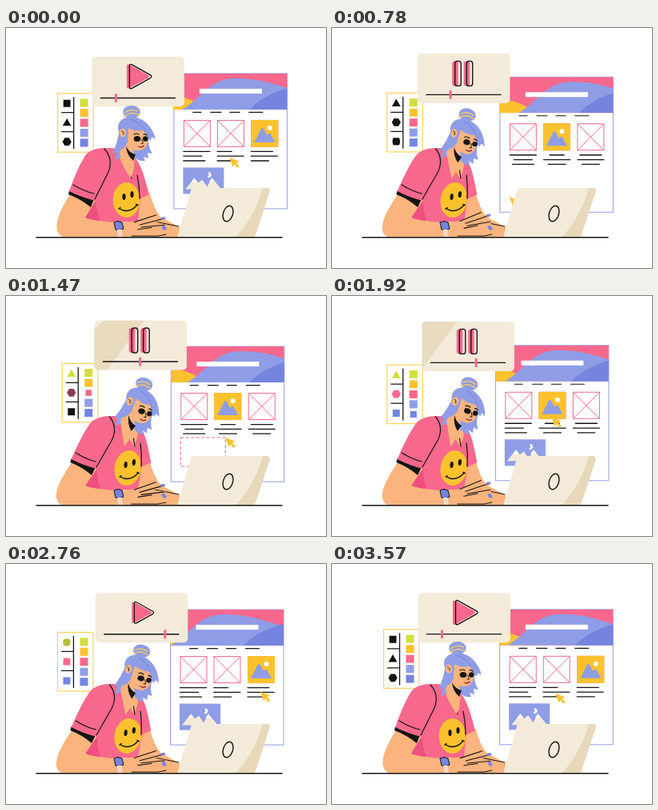
Write an HTML page that moves like this. It is 400 px wide and 300 px high and loops after 3.6 s.

```html
<!DOCTYPE html>
<html lang="en">
<head>
<meta charset="utf-8">
<title>Designer at work</title>
<style>
html, body { margin: 0; width: 100%; height: 100%; overflow: hidden; background: #fff; }
svg { display: block; width: 100vw; height: 100vh; }
.ink { fill: none; stroke: #151515; stroke-width: 1.4; stroke-linecap: round; stroke-linejoin: round; }
.pink { fill: #f7688c; }
.rose { fill: #ee4f80; }
.blue { fill: #8f9de6; }
.deep { fill: #7584de; }
.gold { fill: #fcc22e; }
.skin { fill: #fbb47d; }
.cream { fill: #f3eada; }
.tan { fill: #e6d8b8; }
.white { fill: #fff; }
.dark { fill: #151515; }
</style>
</head>
<body>
<svg viewBox="0 0 400 300" xmlns="http://www.w3.org/2000/svg">
  <defs>
    <clipPath id="headClip"><rect width="141.5" height="45"/></clipPath>
    <clipPath id="videoClip"><rect width="115.5" height="62" rx="5"/></clipPath>
  </defs>

  <g id="page">
    <rect width="141.5" height="169" fill="#fff" stroke="#8f9de6"/>
    <g clip-path="url(#headClip)">
      <rect class="pink" width="141.5" height="45"/>
      <path class="gold" id="sand" d="M-20 45V30Q15 22 44 45Z"/>
      <path class="blue" id="hill" d="M-62 45C-38 32 -28 6 4 6S48 12 90 24V45Z"/>
      <path class="deep" id="slope" d="M95 45C108 32 124 22 160 14V45Z"/>
    </g>
    <rect class="white" x="32" y="19" width="78" height="6"/>
    <path class="ink" d="M24 48.5h10M46 48.5h13M70 48.5h12M94 48.5h17" style="stroke-width:1.2"/>
    <g id="copy" class="ink" style="stroke-width:1.3"></g>
    <g id="boxes" fill="#fff" stroke="#f7688c"></g>
    <g id="night">
      <rect class="blue" width="51" height="33"/>
      <path class="cream" d="M3 27L14 13L19 19L24 15L30 24L36 13L48 27Z"/>
      <path class="white" d="M14 13L18 18L15 17L13 19L11 17ZM36 13L40 18L37 17L34 19L33 17Z"/>
      <path class="white" d="M31 6a3.4 3.4 0 1 1-1 6a3.6 3.6 0 0 0 1-6Z"/>
    </g>
    <g id="photo">
      <rect class="gold" width="34" height="34"/>
      <path class="blue" d="M4 28L12.5 11Q14 9 15.5 11L20 19L22 17Q23 16 24 17L30 28Z"/>
      <circle class="white" cx="23.5" cy="10" r="3"/>
    </g>
    <rect id="marquee" fill="none" stroke="#f7688c" stroke-width="1.1" stroke-dasharray="4 2.5"/>
    <path class="gold" id="cursor" d="M0 0L12 4.5L8.5 6.5L12.5 11L10 13L6.5 8.5L4 11.5Z"/>
  </g>

  <g id="chart">
    <rect width="44.5" height="73.5" fill="#fff" stroke="#fcd25a" stroke-width="1.2"/>
    <path class="ink" d="M20 5V69M5 24H20M5 48H20" style="stroke-width:1.3"/>
    <g id="swatches"></g>
    <g id="forms"></g>
  </g>

  <g id="video">
    <rect class="cream" width="115.5" height="62" rx="5"/>
    <g clip-path="url(#videoClip)"><path id="sheen" class="tan" d="M-20 62V26L14 0H62L16 62Z"/></g>
    <g id="play">
      <path class="pink" d="M43.5 12Q43.5 8 47 10L70 22.500Q73 24.500 70 26.500L47 39Q43.500 41 43.500 37Z"/>
      <path class="ink" d="M47 12Q47 8 50.500 10L73 22.500Q76 24.500 73 26.500L50.500 39Q47 41 47 37Z"/>
    </g>
    <g id="pause"></g>
    <path class="ink" d="M11 51.500H104"/>
    <rect class="pink" id="knob" y="46" width="3" height="11" rx="1"/>
  </g>

  <path class="skin" d="M163 208L180 207Q184 224 193 236L217 249V262H160L150 240Z"/>
  <g id="torso">
    <path class="skin" d="M82 204C73 220 61 238 64 253Q66 262 78 262H142L137 242L99 237L114 216Z"/>
    <path class="dark" d="M79 203L110 214L106 224Q92 213 78 208Z"/>
    <path class="pink" d="M142 151C125 149 110 149 101 157C93 167 86 185 79 204Q95 212 112 216L99 237Q130 246 165 241L168 213L179 208C174 190 170 172 161 162Z"/>
    <path class="rose" d="M112 216L99 237Q107 240 118 241Q113 228 112 216Z"/>
    <path class="skin" d="M139 151Q143 170 156 188Q161 178 160 158Z"/>
    <ellipse class="gold" cx="150.500" cy="215" rx="16.800" ry="22"/>
    <ellipse class="dark" cx="147.500" cy="211" rx="2.100" ry="4"/>
    <ellipse class="dark" cx="157.500" cy="208" rx="2.100" ry="4"/>
    <path class="ink" d="M142 226Q154 233 164 221M141 226l2-1.500M162.500 220.500l2.500 1"/>
    <path class="pink" d="M161 172L179 208L166 214Q168 196 161 172Z"/>
    <path class="ink" d="M123 151C131 160 132 170 128 180L111 214M84 196Q97 204 110 207M155 178L157 188M164 184Q167 198 167 213" style="stroke-width:1.2"/>
  </g>

  <g id="head">
    <path class="blue" d="M142 125Q140 142 133 157L138 155L137 165Q143 163 146 158L148 163Q155 153 154 134Z"/>
    <path class="blue" d="M157 113C174 114 181 124 184 135L178 140Q178 149 183 157L177 156L178 163L172 161L174 166Q167 167 162 163Q155 156 157 146Z"/>
    <path class="skin" d="M148 134L142 157Q148 170 156 187Q162 176 160 155Z"/>
    <path class="dark" d="M150 148Q154 156 162 158L159 166Q151 159 150 148Z"/>
    <path class="skin" d="M147 122L149 142C152 150 160 154 168 153C174 151 177 146 177 140L174 124Z"/>
    <path class="blue" d="M140 126C139 115 149 110 159 111C173 113 183 123 187 139L182 136L181 141Q175 134 172 128Q161 130 153 125L152 143Q149 150 143 153Q146 142 145 126L141 130Z"/>
    <ellipse class="skin" cx="146" cy="131" rx="4" ry="5.500"/>
    <path class="ink" d="M144.500 129q3 0 2.500 4" style="stroke-width:.9"/>
    <path class="ink" d="M160 133q3-2 6 0M172 133q2-1 4 1" style="stroke-width:1.2"/>
    <ellipse class="dark" cx="164" cy="138.500" rx="4.300" ry="3.500"/>
    <ellipse class="dark" cx="174.200" cy="138.500" rx="3.200" ry="3.200"/>
    <path class="ink" d="M169.500 139L171.500 144L169 144.500" style="stroke-width:.9"/>
    <path d="M165 148Q169 150.500 172.500 147" fill="none" stroke="#8e2740" stroke-width="1.300"/>
    <ellipse class="blue" cx="157" cy="105" rx="10.800" ry="8"/>
    <path d="M147 111Q157 103 167 109M148 106Q156 100 165 104" fill="none" stroke="#f1c865" stroke-width="1.500"/>
    <path class="ink" d="M155 114Q167 117 174 128" style="stroke:#6e7dd5;stroke-width:.8"/>
  </g>

  <path class="skin" d="M140 262L138 245L163 242L181 238L217 249V262Z"/>
  <path class="ink" d="M157 260H190L200 258M186 242L216 248" style="stroke-width:1"/>
  <g id="hand">
    <path class="skin" d="M140 242Q153 244 165 240L187 231Q190 231 188 234L178 239L196 235Q200 236 197 238L181 243L199 243Q201 246 197 247L181 248L164 253L142 258Z"/>
    <path class="ink" d="M160 242L187 232M167 245L197 236M169 248L198 244M165 251L182 248" style="stroke-width:1.100"/>
    <path class="deep" d="M193 234.500l5-.5l1 2.500l-5 1.500Z"/>
  </g>
  <path class="deep" d="M194 248l4-1.500l3 5l-4 1.500Z"/>
  <path class="deep" d="M135 243Q140 240 145 243L147 251Q142 254 137 252Z" stroke="#151515"/>
  <path d="M139 252L140 262H146L145 252Z" fill="#f3d6c4"/>

  <path class="cream" d="M235 200H325Q331 200 329.500 205L312 258Q311 262 307 262H214L231 203Q232 200 235 200Z"/>
  <path class="tan" d="M321 200H325Q331 200 329.500 205L312 258Q311 262 307 262H287Q311 236 321 200Z"/>
  <ellipse class="ink" cx="277.500" cy="232" rx="6" ry="10" transform="rotate(17 277.500 232)"/>
  <path class="ink" d="M38 261.700H345" style="stroke-width:1.500"/>
</svg>
<script>
const LOOP = 3600, NS = "http://www.w3.org/2000/svg";
const $ = id => document.getElementById(id);
const set = (el, o) => { for (const k in o) el.setAttribute(k, o[k]); };
const add = (parent, tag, o) => {
  const el = document.createElementNS(NS, tag);
  set(el, o);
  return parent.appendChild(el);
};
const clamp = v => Math.max(0, Math.min(1, v));
const mix = (a, b, p) => a + (b - a) * p;
const ease = p => p * p * (3 - 2 * p);
const ramp = (t, a, b) => ease(clamp((t - a) / (b - a)));
const pulse = (t, a, b, c, d) => ramp(t, a, b) * (1 - ramp(t, c, d));
const wave = (t, peak) => Math.cos((t - peak) / LOOP * 2 * Math.PI);
const move = (el, x, y, more = "") => set(el, { transform: `translate(${x} ${y}) ${more}` });
const show = (el, v) => set(el, { opacity: v });

// Eased value through alternating time and value entries
function track(t, ...k) {
  for (let i = 2; i < k.length; i += 2)
    if (t < k[i]) return mix(k[i - 1], k[i + 1], ramp(t, k[i - 2], k[i]));
  return k[k.length - 1];
}

for (const x of [12, 54, 96.5])
  move(add($("boxes"), "path", { d: "M.5.500H33.500V33.500H.5ZL33.500 33.500M33.500.500L.500 33.500" }), x, 58);

for (const x of [46.8, 61.3]) {
  add($("pause"), "rect", { class: "pink", x: x - 3.5, y: 9.5, width: 7.5, height: 31, rx: 3 });
  add($("pause"), "rect", { class: "ink", x, y: 9.5, width: 7.5, height: 31, rx: 3 });
}

const swatches = ["#d3de3e", "#fcc22e", "#f7688c", "#8f9de6", "#7584de"].map(fill =>
  add($("swatches"), "rect", { x: -5, y: -5, width: 10, height: 10, fill }));

const lines = [33, 23, 27, 18, 33, 22, 27, 33, 22].map(w => ({ w, el: add($("copy"), "path", {}) }));

// Outline radius of a regular polygon: sides, first corner in degrees, size
const poly = (n, turn, r) => a => {
  const step = 360 / n, q = (((a - turn) % step) + step) % step;
  return r * Math.cos(Math.PI / n) / Math.cos((q - step / 2) * Math.PI / 180);
};
const square = poly(4, 45, 6.3), tri = poly(3, -90, 6.3), hex = poly(6, 0, 5.6), disc = () => 4.8;

const forms = [
  { steps: [square, 250, 700, tri, 2050, 2400, disc, 2650, 3000, square], rgb: [211, 222, 62], on: 1000, off: 2700 },
  { steps: [tri, 250, 700, hex, 2050, 2400, square, 2700, 3030, tri], rgb: [247, 104, 140], on: 1360, off: 2970 },
  { steps: [hex, 450, 1030, square, 2950, 3320, hex], rgb: [112, 134, 222], on: 1680, off: 3160 }
].map(f => ({ ...f, el: add($("forms"), "path", {}) }));

function drawForm(f, i, t) {
  let d = "";
  for (let a = 0; a < 360; a += 5) {
    let r = f.steps[0](a), low = f.steps[0] === tri ? 1 : 0;
    for (let s = 1; s < f.steps.length; s += 3) {
      const p = ramp(t, f.steps[s], f.steps[s + 1]), next = f.steps[s + 2];
      r = mix(r, next(a), p);
      low = mix(low, next === tri ? 1 : 0, p);
    }
    const q = a * Math.PI / 180;
    d += `${d ? "L" : "M"}${(11.5 + r * Math.cos(q)).toFixed(2)} ${(12.5 + i * 24 + low + r * Math.sin(q)).toFixed(2)}`;
  }
  const c = pulse(t, f.on, f.on + 220, f.off, f.off + 240);
  set(f.el, { d: d + "Z", fill: `rgb(${f.rgb.map(v => Math.round(mix(18, v, c)))})` });
}

function drawPage(t) {
  move($("page"), 207.3 + 3.3 * wave(t, 390), 59.6 + 3.5 * wave(t, 1400));
  move($("hill"), 74 + 12 * wave(t, 1000), 0);
  move($("sand"), -2 + 3 * wave(t, 900), 0);
  move($("slope"), 4 * wave(t, 1000), 0);

  const right = 1 - pulse(t, 250, 620, 2080, 2450);
  const held = pulse(t, 2000, 2100, 2500, 2640);
  const px = mix(54, 96.5, right);
  move($("photo"), px - held, 58 - held, `scale(${1 + .06 * held})`);

  lines.forEach(({ w, el }, i) => {
    const col = Math.floor(i / 3), wait = col * 170;
    const mid = pulse(t, 250 + wait / 2, 600 + wait / 2, 1600 + wait * 1.7, 1860 + wait * 1.7);
    const x = 12 + col * 42.25 + mid * (34 - w) / 2;
    set(el, { d: `M${x} ${97.5 + i % 3 * 5.8}h${w}` });
  });

  const cx = t > 2080 && t < 2500 ? px + 16
    : track(t, 0, 69.5, 200, 69.5, 680, 12, 780, 12, 1400, 68, 1500, 68, 1850, 70, 2080, 70, 2500, 112.5, 3090, 112.5, 3500, 69.5);
  const cy = track(t, 0, 105, 200, 105, 680, 150, 780, 150, 1400, 114, 1500, 114, 1850, 90, 2500, 91, 2850, 105);
  move($("cursor"), cx, cy);

  const drawn = ramp(t, 780, 1400);
  set($("marquee"), { x: 12, y: 150 - 36 * drawn, width: 56 * drawn, height: 36 * drawn });
  show($("marquee"), t >= 780 && t < 1510 ? 1 : 0);

  const pop = t < 1000 ? 1 - ramp(t, 300, 560) : ramp(t, 1510, 1720);
  move($("night"), 11.5 + 25.5 * (1 - pop), 117.5 + 16.5 * (1 - pop), `scale(${pop})`);
}

function drawChart(t) {
  move($("chart"), 67 + 3.3 * wave(t, 1350), 83.7 - 2.8 * wave(t, 450));
  swatches.forEach((el, i) => {
    const hit = 1110 + i * 190;
    const dip = pulse(t, hit - 130, hit, hit, hit + 150);
    move(el, 33, 11.8 + i * 12.5, `scale(${1 - .26 * dip})`);
  });
  forms.forEach((f, i) => drawForm(f, i, t));
}

function drawVideo(t) {
  move($("video"), 109.7 - 3.3 * wave(t, 450), 33.7 - 3.3 * wave(t, 1350));
  const on = t >= 300 && t < 2760;
  const press = 1 - .12 * Math.max(pulse(t, 200, 300, 300, 420), pulse(t, 2660, 2760, 2760, 2880));
  for (const [id, vis] of [["play", !on], ["pause", on]]) {
    show($(id), vis ? 1 : 0);
    move($(id), 60 * (1 - press), 25 * (1 - press), `scale(${press})`);
  }
  const run = 30 + clamp((t - 300) / 2450) * 57;
  set($("knob"), { x: mix(run, 30, ramp(t, 2850, 3560)) - 1.5 });
  show($("sheen"), .8 * pulse(t, 1200, 1420, 1920, 2250));
  move($("sheen"), (1470 - t) * .04, 0);
}

function drawWoman(t) {
  const tilt = track(t, 0, 0, 180, 0, 850, 13.5, 1470, 17, 1920, 16, 2430, 15, 2650, 14.5, 3400, 0);
  set($("head"), { transform: `rotate(${tilt} 148 160)` });
  const lean = 4.2 * Math.min(1, tilt / 13);
  set($("torso"), { transform: `translate(0 240) skewX(${-lean}) translate(0 -240)` });
  const beat = Math.cos((t / LOOP * 7 - .63) * 2 * Math.PI);
  const lift = ramp(beat, -.3, .8);
  set($("hand"), { transform: `rotate(${2.5 - 4.5 * lift} 146 250)` });
}

function draw(t) {
  drawPage(t);
  drawChart(t);
  drawVideo(t);
  drawWoman(t);
}

const start = performance.now();
function tick() {
  draw((performance.now() - start) % LOOP);
  requestAnimationFrame(tick);
}
tick();
</script>
</body>
</html>
```
